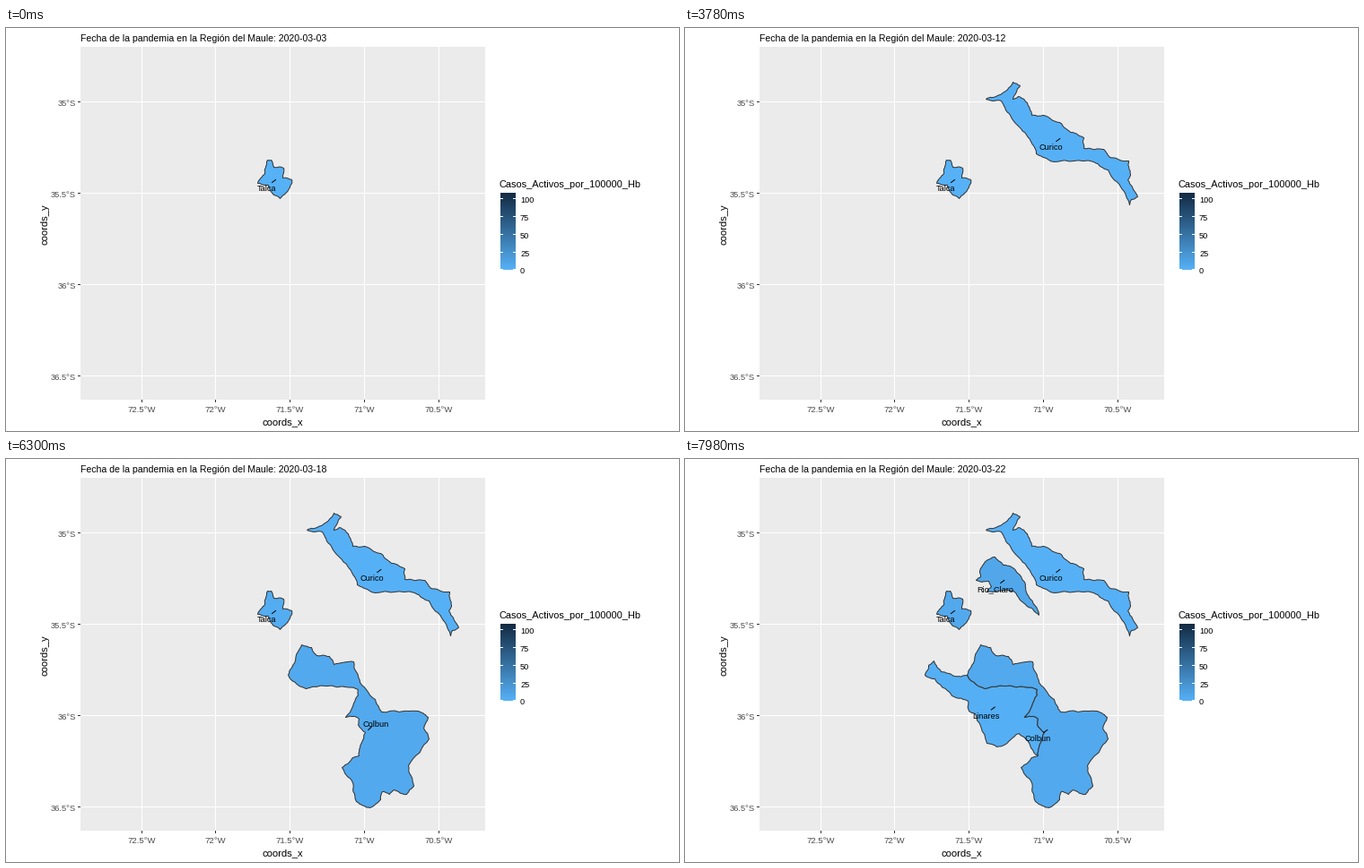
A matplotlib script for the animation above (8 s loop, 750x450 px).

```python
import matplotlib.pyplot as plt
import numpy as np
from matplotlib.animation import FuncAnimation
from matplotlib.collections import LineCollection
from matplotlib.patches import Polygon, Rectangle

plt.rcParams["font.family"] = ["Liberation Sans", "DejaVu Sans"]

W, H, DPI = 750, 450, 100
PX = 72 / DPI  # points per pixel
STEP, DAY_MS, LOOP_MS = 20, 420, 8000
LIGHT, DARK = np.array([86, 177, 247]) / 255, np.array([19, 43, 67]) / 255
MAX_CASES = 107

# Corner points of each outline; the coastline detail is generated
TALCA = [(291, 147), (295, 147), (298, 155), (309, 156), (308, 167), (318, 169),
         (318, 173), (311, 184), (305, 190), (297, 185), (292, 175), (280, 173),
         (288, 162), (289, 154)]
CURICO = [(335, 79), (346, 76), (363, 64), (365, 60), (373, 64), (365, 79), (371, 76),
          (381, 83), (386, 97), (398, 97), (417, 105), (429, 116), (444, 122),
          (444, 134), (466, 135), (473, 144), (494, 148), (496, 163), (493, 169),
          (504, 188), (497, 191), (495, 197), (487, 180), (471, 158), (455, 149),
          (411, 149), (391, 140), (384, 124), (362, 97), (352, 81)]
RIO_CLARO = [(345, 109), (354, 118), (365, 121), (378, 137), (382, 152), (394, 174),
             (379, 162), (365, 147), (336, 148), (341, 142), (338, 136), (324, 135),
             (329, 131), (328, 125), (334, 114)]
SHARED = [(314, 241), (325, 252), (334, 256), (345, 254), (392, 257), (392, 263),
          (378, 288), (388, 287), (393, 290), (392, 296), (400, 305), (395, 318),
          (393, 331)]
LINARES = SHARED + [(379, 312), (372, 306), (357, 318), (347, 321), (336, 317),
                    (323, 284), (316, 281), (315, 270), (297, 264), (278, 245),
                    (267, 241), (271, 230), (277, 225), (285, 237), (300, 242)]
COLBUN = SHARED[::-1] + [(319, 230), (329, 207), (340, 210), (346, 219), (360, 220),
                         (365, 229), (387, 226), (394, 249), (411, 268), (418, 282),
                         (459, 281), (470, 288), (465, 300), (471, 312), (448, 342),
                         (454, 365), (446, 374), (432, 369), (427, 374), (419, 371),
                         (417, 380), (405, 389), (390, 382), (385, 359), (374, 344),
                         (386, 333)]


def coastline(corners, depth=3):
    """Midpoint displacement; it depends on place only, so shared borders agree."""
    pts = np.array(corners, float)
    for _ in range(depth):
        following = np.roll(pts, -1, axis=0)
        mid = (pts + following) / 2
        reach = np.minimum(0.09 * np.hypot(*(following - pts).T), 1.2)
        angle = mid @ np.array([12.9, 78.2])
        mid += reach[:, None] * np.column_stack([np.sin(angle), np.cos(angle)])
        pts = np.stack([pts, mid], axis=1).reshape(-1, 2)
    return pts + 0.5


def shade(cases):
    return LIGHT + (DARK - LIGHT) * cases / MAX_CASES


fig = plt.figure(figsize=(W / DPI, H / DPI), dpi=DPI, facecolor="white")
ax = fig.add_axes([0, 0, 1, 1])
ax.set_axis_off()


def write(x, y, text, size, color="black", **kw):
    return ax.text(x, y, text, fontsize=size * PX, color=color, **kw)


def strokes(segments, color):
    lines = LineCollection(segments, colors=color, linewidths=PX, zorder=2)
    lines.set_snap(False)
    ax.add_collection(lines)


# Panel, grid and axes
LEFT, RIGHT, TOP, BOTTOM = 83, 534, 21, 415
ax.add_patch(Rectangle((LEFT, TOP), RIGHT - LEFT, BOTTOM - TOP, color="#EBEBEB", lw=0))
for i in range(5):
    x = int(151 + 82.75 * i) + 0.5
    strokes([[(x, TOP), (x, BOTTOM)]], "white")
    strokes([[(x, BOTTOM), (x, BOTTOM + 3)]], "#333333")
    write(x, 429, f"{72.5 - i / 2:g}°W", 9.5, "#4D4D4D", ha="center")
for i in range(4):
    y = 82.5 + 102 * i
    strokes([[(LEFT, y), (RIGHT, y)]], "white")
    strokes([[(LEFT - 3, y), (LEFT, y)]], "#333333")
    write(78, y + 4.5, f"{35 + i / 2:g}°S", 9.4, "#4D4D4D", ha="right")
write(308, 443, "coords_x", 11.2, ha="center")
write(46.5, 241.5, "coords_y", 11.2, rotation=90, rotation_mode="anchor")
title = write(LEFT, 15, "", 10.53)

# Colour bar
write(549.5, 178, "Casos_Activos_por_100000_Hb", 10.95)
bar = np.array([[shade(v)] for v in np.linspace(MAX_CASES, 0, 86)])
ax.imshow(bar, extent=(551, 568, 270, 184), aspect="auto", interpolation="nearest")
for value in range(0, 101, 25):
    y = round(269.6 - 0.8 * value) + 0.5 - (value == 0)
    strokes([[(x, y), (x + 3, y)] for x in (551, 565)], "white")
    write(573, y + 4.5, str(value), 9.1)

ax.set_xlim(0, W)
ax.set_ylim(H, 0)


class Commune:
    """An outline whose label sits below left or above right of its centre."""

    def __init__(self, name, corners, centre, start, cases, raised=()):
        self.centre, self.start = np.array(centre), start
        self.cases, self.raised = cases, raised
        self.area = ax.add_patch(Polygon(coastline(corners), ec="#333333", lw=PX,
                                         zorder=3, snap=False))
        self.line, = ax.plot([], [], color="black", lw=PX, zorder=4, snap=False)
        self.label = write(0, 0, name, 9.2, ha="center", zorder=5)

    def show(self, day):
        for artist in (self.area, self.line, self.label):
            artist.set_visible(day >= self.start)
        up = day in self.raised
        self.label.set_position(self.centre + ((8, -3.5) if up else (-10.3, 12.5)))
        tip = self.centre + ((4, -4) if up else (-4, 3))
        self.line.set_data(*np.transpose([self.centre, tip]))
        self.area.set_facecolor(shade(self.cases(day)))


communes = [
    Commune("Talca", TALCA, (300.5, 169.5), 0, lambda day: max(0, day - 9) * 0.6,
            raised=(3, 5, 6, 7, 8)),
    Commune("Curico", CURICO, (417.8, 123.5), 8, lambda day: 0.7, raised=(10,)),
    Commune("Linares", LINARES, (345.3, 277), 19, lambda day: 1.5),
    Commune("Colbun", COLBUN, (403.8, 302.5), 15, lambda day: 6, raised=(15, 16, 17)),
    Commune("Rio_Claro", RIO_CLARO, (355.7, 135.5), 18, lambda day: 8),
]


def update(frame):
    day = frame * STEP // DAY_MS
    title.set_text(f"Fecha de la pandemia en la Región del Maule: 2020-03-{day + 3:02d}")
    for commune in communes:
        commune.show(day)
    return []


anim = FuncAnimation(fig, update, frames=LOOP_MS // STEP, interval=STEP,
                     repeat=True, repeat_delay=0, blit=False)
plt.show()
```
